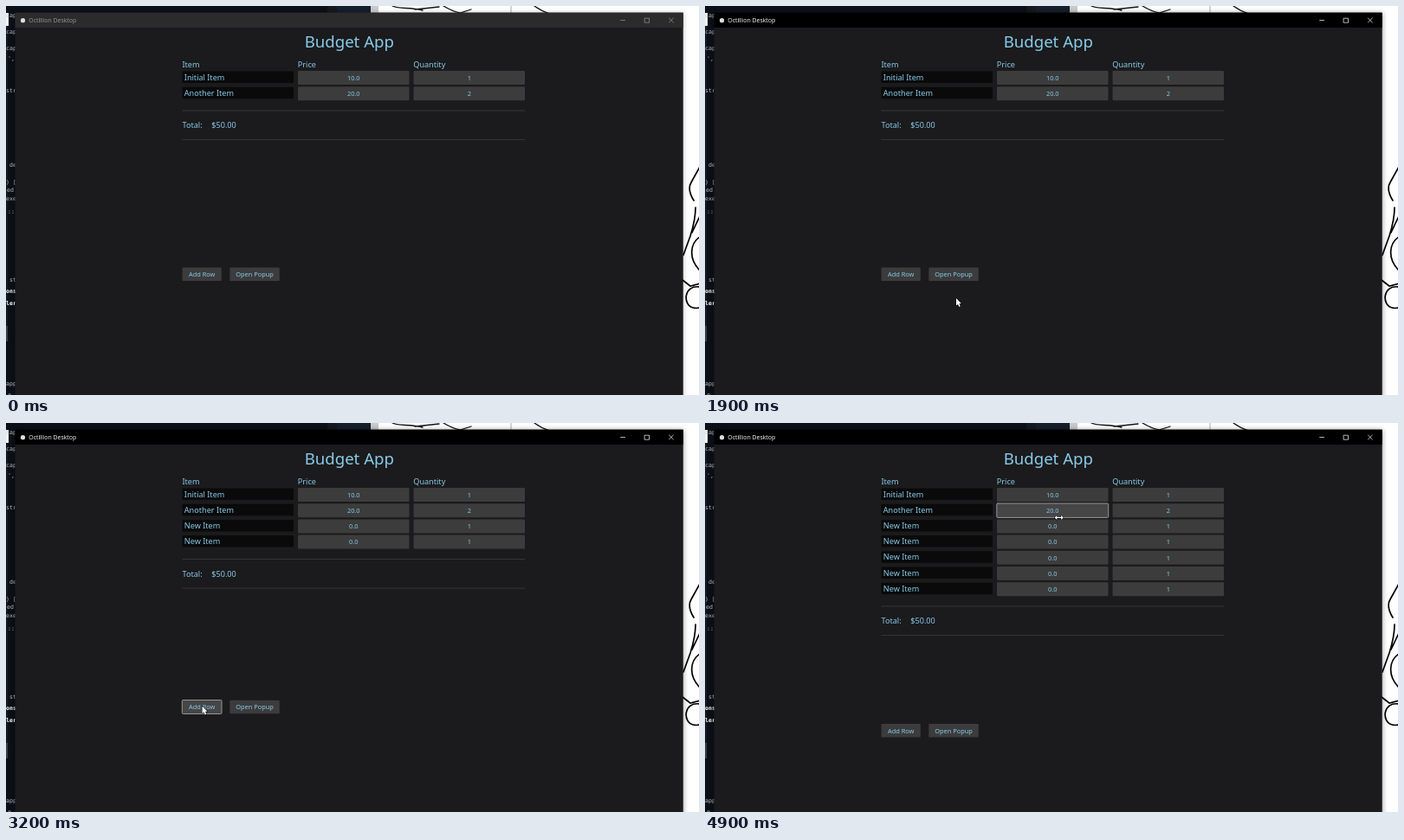
An HTML page with a canvas for the animation above (5000 ms loop, 800 by 450 pixels).

```html
<!DOCTYPE html>
<html lang="en">
<head>
<meta charset="utf-8">
<title>Budget App</title>
<style>
html, body { margin: 0; width: 100%; height: 100%; overflow: hidden; background: #1b1a1c; }
canvas { display: block; width: 800px; height: 450px; }
</style>
</head>
<body>
<canvas id="stage" width="800" height="450"></canvas>
<script>
const ctx = document.getElementById('stage').getContext('2d');
const LOOP = 5000, STEP = 100;
const UI = '"Noto Sans", "Open Sans", sans-serif';
const MONO = '"DejaVu Sans Mono", monospace';
const BLUE = '#87cbe8', GREY = '#3c3c3c', ROW = 18.2;
const BODY = 9.1, SMALL = 7.4, HEADING = 18.6;

// Moments at which a click on "Add Row" completes; each press starts shortly before.
const clicks = [2500, 2900, 3400, 3800, 4100];
const pressTime = 150;

// Pointer path: time, x, y
const pointer = [
  [300, 24, 404], [500, 260, 330], [800, 510, 259], [1200, 510, 259],
  [1800, 290, 338], [2000, 290, 338], [2300, 228, 314], [2500, 228, 315],
  [2700, 227, 324], [3100, 227, 324], [3300, 226, 331], [3600, 225, 335],
  [3700, 225, 335], [3900, 227, 340], [4400, 227, 340], [4900, 408.7, 109], [5000, 408.7, 109]
];

function pointerAt(t) {
  if (t < pointer[0][0]) return null;
  const i = pointer.findIndex(p => p[0] > t);
  const [t0, x0, y0] = pointer[i - 1], [t1, x1, y1] = pointer[i];
  const u = (t - t0) / (t1 - t0), k = u * u * (3 - 2 * u);
  return { x: x0 + (x1 - x0) * k, y: y0 + (y1 - y0) * k };
}

function rect(x, y, w, h, color) {
  ctx.fillStyle = color;
  ctx.fillRect(x, y, w, h);
}

function text(s, x, y, size, color = BLUE, align = 'left', family = UI, weight = 400) {
  ctx.font = `${weight} ${size}px ${family}`;
  ctx.textAlign = align;
  ctx.fillStyle = color;
  ctx.fillText(s, x, y);
}

function stroke(d, color, width) {
  ctx.strokeStyle = color;
  ctx.lineWidth = width;
  ctx.stroke(new Path2D(d));
}

function box(x, y, w, h, fill, outline) {
  ctx.beginPath();
  ctx.roundRect(x, y, w, h, 1.2);
  ctx.fillStyle = fill;
  ctx.fill();
  if (!outline) return;
  ctx.strokeStyle = outline;
  ctx.lineWidth = 1;
  ctx.stroke();
}

function widget(label, x, y, w, h, mouse, pressed) {
  const over = mouse && mouse.x >= x && mouse.x <= x + w && mouse.y >= y && mouse.y <= y + h;
  if (over && pressed) box(x - 0.2, y - 0.2, w + 0.4, h + 0.4, '#373737', '#fff');
  else if (over) box(x - 0.2, y - 0.2, w + 0.4, h + 0.4, '#464646', '#969696');
  else box(x, y, w, h, GREY);
  text(label, x + w / 2, y + h / 2 + 2.7, SMALL, BLUE, 'center');
  return over;
}

function drawBackdrop() {
  rect(0, 0, 800, 450, '#fff');
  rect(0, 0, 422, 450, '#0b0f17');
  rect(371, 0, 11, 8, '#15181c');
  rect(382, 0, 39, 8, '#151e2b');
  rect(421, 0, 9, 8, '#c9cacc');
  rect(0, 8, 3, 15, '#f4f4f4');
  rect(0, 370, 2, 18, '#3a4049');
  rect(0, 23, 2, 347, '#151a22');

  const lines = [
    ['cap', 0, 13], ['cap', 0, 32], ['cap', 0, 51], ["',", 2, 63], ['str', 0, 100], ['de', 4, 186],
    [') [', 0, 206], ['ed', 1, 215], ['exe', 0, 225], ['::', 2, 240], ['st', 4, 319], ['app', 0, 439], ['e', 2, 452]
  ];
  for (const [s, x, y] of lines) text(s, x, y, 6.6, '#b9c0c8', 'left', MONO);
  text('ons', 0, 332, 6.6, '#fff', 'left', MONO, 700);
  text('ler', 0, 346, 6.6, '#fff', 'left', MONO, 700);

  ctx.lineCap = 'round';
  stroke('M446 0C455 4 466 1 481 5M472 4L500 1M505 0Q515 6 524 8L537 4M610 0Q618 6 628 9', '#111', 1.3);
  stroke('M583 0V8', '#888', 0.7);
  stroke('M801 186L791 204Q786 212 794 225M796 233Q796 247 790 266L782 288' +
    'M801 243L792 262M801 267C789 275 788 293 801 306M781 317L790 324L801 321' +
    'M801 325C782 322 781 346 793 349Q797 350 801 349', '#000', 1.7);
}

function drawWindow(active) {
  ctx.save();
  ctx.shadowColor = active ? 'rgba(0, 0, 0, 0.4)' : 'rgba(0, 0, 0, 0.25)';
  ctx.shadowBlur = 6;
  rect(10.5, 7.7, 771.2, 460, '#1b1a1c');
  ctx.restore();
  rect(10.5, 7.7, 771.2, 17.3, active ? '#000' : '#2b2b2c');
  const ink = active ? '#fff' : '#9a9a9a';
  ctx.beginPath();
  ctx.arc(19.5, 16.7, 2.6, 0, 7);
  ctx.fillStyle = '#ddd';
  ctx.fill();
  text('Octillion Desktop', 26.3, 19.3, 6.9, ink, 'left', '"Open Sans", "Noto Sans", sans-serif');
  stroke('M709.7 16.5H714.5M737.5 14.2H742.5V19.2H737.5ZM765.4 14L770.4 19M770.4 14L765.4 19', ink, 0.7);
}

function drawApp(rows, mouse, pressed) {
  text('Budget App', 396.3, 48.2, HEADING, BLUE, 'center');
  text('Item', 203.5, 71.2, BODY);
  text('Price', 336.8, 71.2, BODY);
  text('Quantity', 470.3, 71.2, BODY);

  let dragging = false;
  for (let i = 0; i < rows; i++) {
    const y = 75 + i * ROW;
    const [name, price, count] = [['Initial Item', '10.0', '1'], ['Another Item', '20.0', '2']][i] || ['New Item', '0.0', '1'];
    box(203.5, y + 0.5, 128.5, 13.5, '#0a0a0a');
    text(name, 205.8, y + 10.6, BODY);
    const overPrice = widget(price, 337, y, 128.5, 16, mouse, pressed);
    const overCount = widget(count, 470.5, y, 128.5, 16, mouse, pressed);
    dragging = dragging || overPrice || overCount;
  }

  const shift = (rows - 2) * ROW;
  rect(203.5, 120.6 + shift, 395.5, 0.8, GREY);
  text('Total:', 203.5, 141.4 + shift, BODY);
  text('$50.00', 237.3, 141.4 + shift, BODY);
  rect(203.5, 154.3 + shift, 395.5, 0.8, GREY);

  const y = 302.5 + shift / 2;
  widget('Add Row', 203.5, y, 45.3, 15.6, mouse, pressed);
  widget('Open Popup', 258.3, y, 57.5, 15.6, mouse, pressed);
  return dragging;
}

function drawPointer({ x, y }, dragging) {
  ctx.save();
  ctx.translate(x, y);
  ctx.lineJoin = 'round';
  const shape = new Path2D(dragging
    ? 'M-5 0.4L-2.4 -2.2V-0.3H2.4V-2.2L5 0.4L2.4 3V1.1H-2.4V3Z'
    : 'M0 0V8.6L2 6.9L3.3 9.9L4.8 9.2L3.5 6.3H6Z');
  ctx.strokeStyle = '#000';
  ctx.lineWidth = 1;
  ctx.stroke(shape);
  ctx.fillStyle = '#fff';
  ctx.fill(shape);
  ctx.restore();
}

function draw(time) {
  const t = Math.floor((time % LOOP) / STEP) * STEP;
  const rows = 2 + clicks.filter(c => t >= c).length;
  const pressed = clicks.some(c => t >= c - pressTime && t < c);
  const mouse = pointerAt(t);
  drawBackdrop();
  drawWindow(t >= 900);
  const dragging = drawApp(rows, mouse, pressed);
  if (mouse) drawPointer(mouse, dragging);
}

const start = performance.now();
function tick() {
  draw(performance.now() - start);
  requestAnimationFrame(tick);
}
tick();
</script>
</body>
</html>
```
